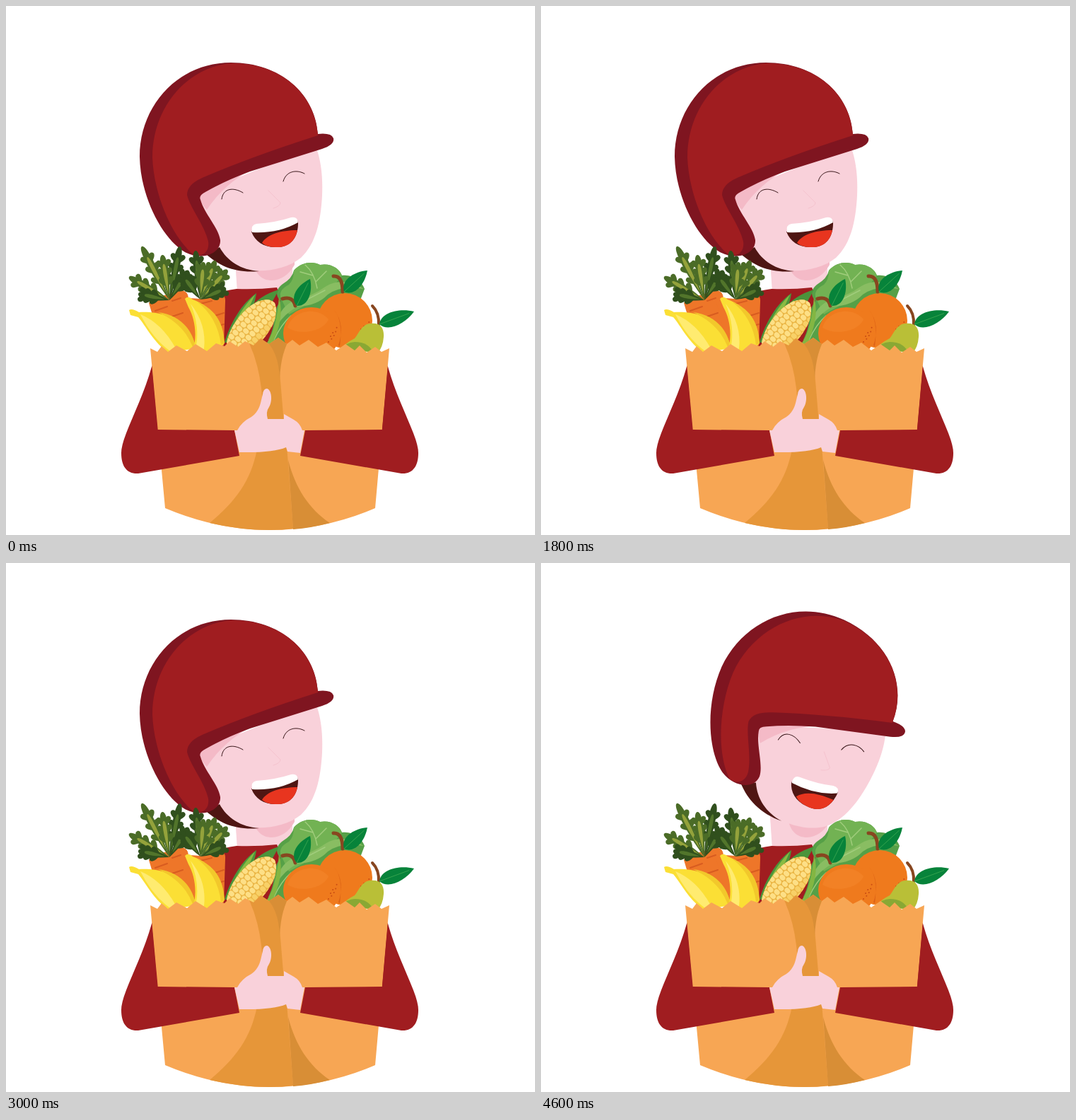
Recreate the animation shown at these times as an HTML page. Size 748 px wide and 748 px high, loop 4.8 s.

```html
<!DOCTYPE html>
<html lang="en">
<head>
<meta charset="utf-8">
<title>Grocery delivery</title>
<style>
html, body { margin: 0; width: 100%; height: 100%; overflow: hidden; background: #fff; }
svg { display: block; width: 100%; height: 100%; }
</style>
</head>
<body>
<svg viewBox="0 0 748 748" fill="none" stroke-linecap="round">
  <!-- neck and shirt -->
  <path fill="#f9d1da" d="M323 345L327 405Q365 425 405 400V345Z"/>
  <path fill="#f4bac7" d="M349 362C353 380 362 388 376 388Q396 387 408 366V345H349Z"/>
  <path fill="#a01d20" d="M290 410Q307 402 326 400Q356 401 383 398L420 490H290Z"/>

  <g id="head">
    <path fill="#f9d1da" d="M260 270L438 198C446 220 448 243 447 268C445 305 438 336 417 356C395 374 358 378 333 371Q310 361 290 335Z"/>
    <path fill="#f4bac7" d="M270 266L352 229Q310 249 284 288L272 274Z"/>
    <path fill="#4f1613" d="M283 351L302 341C313 361 332 373 358 375C325 378 302 368 283 351Z"/>
    <path fill="#7f1520" d="M441 181C437 124 388 80 318 80C244 80 189 140 189 213C190 270 221 329 253 348C278 361 304 350 303 331C301 314 280 293 275 274Q272 268 282 263Q310 247 345 234L447 202Q465 196 463 187Q460 179 441 181Z"/>
    <path fill="#a01d20" d="M441 182C437 124 388 80 318 81C254 87 207 145 207 214C209 267 235 328 266 352C279 355 288 347 286 333C281 310 260 285 256 267C256 255 267 247 282 241Q350 212 441 183Z"/>
    <g stroke="#351316" stroke-width="1">
      <path d="M305 273C307 257 322 256 335 264"/>
      <path d="M392 248C396 233 411 231 422 237"/>
      <path stroke="#f5c3ce" d="M371 261L388 278Q388 283 378 286"/>
    </g>
    <path fill="#4f1613" d="M347 319L413 304C414 330 400 342 381 341C364 341 352 333 347 319Z"/>
    <path fill="#e8351f" d="M362 335C369 323 388 317 412 317C409 333 398 342 381 341Q369 341 362 335Z"/>
    <path fill="#fff" d="M348 320Q346 309 354 308Q382 306 403 299Q412 297 413 306Q385 322 348 320Z"/>
  </g>

  <!-- carrots -->
  <path fill="#ee7629" d="M202 420Q205 413 221 410L248 402Q257 403 258 413L274 480H220Z"/>
  <path fill="#ee7629" d="M248 420Q251 411 273 414L300 408Q311 407 310 418L308 480H264Z"/>
  <path stroke="#d85c20" stroke-width="2" d="M211 431L228 425M235 417L247 413M229 441L250 434M275 421L291 417M289 440L308 434M296 453L308 450"/>
  <g id="tufts"></g>

  <!-- cabbage -->
  <path fill="#56a047" d="M371 472C384 446 375 435 388 417Q377 405 390 394Q405 385 407 374C418 361 435 361 444 366C460 363 472 372 475 381C491 379 503 389 507 400L490 445L380 480Z"/>
  <path fill="#72b253" d="M389 414Q384 402 400 394Q407 387 407 374C418 361 435 361 444 366C460 363 472 372 475 381L455 406L400 436Z"/>
  <path fill="#89bd62" d="M383 452Q384 430 404 418Q434 410 453 396Q475 383 506 400Q474 394 455 408Q440 424 412 425Q394 435 383 452Z"/>
  <path stroke="#a0cd7c" stroke-width="1.5" d="M440 399Q436 377 423 366M438 390L453 375M434 381L416 376M379 472Q389 450 403 438M422 417L451 402"/>

  <!-- corn -->
  <path fill="#4b943b" d="M309 476C317 448 333 421 354 406C351 432 335 455 317 475Z"/>
  <path fill="#8abb43" d="M314 472Q326 434 352 408Q339 440 318 470Z"/>
  <path fill="#4b943b" d="M344 428Q359 409 386 401L375 421Z"/>
  <path fill="#83b642" d="M366 480Q382 462 386 412Q395 443 374 482Z"/>
  <clipPath id="cob"><path d="M312 477C315 455 335 428 354 419Q372 411 380 420C388 441 371 465 353 482L320 486Z"/></clipPath>
  <g clip-path="url(#cob)"><path fill="#eab544" d="M300 400H400V490H300Z"/><g id="kernels"></g></g>

  <!-- oranges -->
  <ellipse cx="479" cy="445" rx="39" ry="39" fill="#ef7a1d"/>
  <path fill="#dc6116" d="M470 480Q480 450 464 430Q477 445 472 481Z"/>
  <ellipse cx="432" cy="463" rx="40" ry="37" fill="#ef7a1d"/>
  <path fill="#f28125" d="M398 455C404 431 439 423 456 443C450 459 418 467 398 455Z"/>
  <path stroke="#c94c12" stroke-width="2" stroke-dasharray="0 6" d="M456 475Q467 466 468 451M459 467L464 459M499 466Q513 455 514 443M502 457L509 450"/>
  <g stroke="#884620" stroke-width="5">
    <path d="M391 414Q406 410 409 424M463 382Q476 381 476 404"/>
    <path stroke-width="4" d="M518 424Q528 434 527 451"/>
  </g>

  <!-- pear -->
  <path fill="#b9bf37" d="M473 486Q479 477 493 470C500 461 503 450 515 449C529 447 535 455 534 468Q533 482 526 490Z"/>
  <path fill="#89a834" d="M473 486Q480 476 493 475Q512 475 519 489Z"/>
  <g id="leaves"></g>

  <!-- bananas -->
  <path fill="#fbdf35" d="M174 430Q178 427 188 433C220 431 259 442 269 484L230 490C209 477 197 451 187 440L176 437Z"/>
  <path fill="#ffeb70" d="M190 436Q220 448 240 484L232 488Q207 470 190 436Z"/>
  <path fill="#f2c82b" d="M215 433C242 436 263 454 268 482H264Q252 450 215 433Z"/>
  <path fill="#fbdf35" d="M253 414Q258 409 264 415C288 424 306 442 309 477L295 490H264C271 465 267 442 258 426Z"/>
  <path fill="#ffeb70" d="M261 421Q284 450 280 485H268Q275 454 261 421Z"/>
  <path fill="#f2c82b" d="M270 418C292 427 308 444 309 477L304 479Q299 440 270 418Z"/>

  <!-- bag, with the upper arms behind it -->
  <path fill="#a01d20" d="M206 510L216 490H530L540 510L545 600H200Z"/>
  <path fill="#f7a654" d="M204 484L214 489L220 481L229 489L241 480L256 488L268 478L284 488L297 477L309 481L316 474L328 482L338 474L350 480L360 470L372 478L385 469L397 478L405 472L415 480L428 472L441 482L453 476L467 487L480 478L493 487L500 480L510 490L522 482L531 489L542 484L522 710Q450 741 373 741Q298 741 225 710Z"/>
  <path fill="#e69639" d="M344 477L350 480L360 470L372 478L385 469L397 478C389 498 385 510 388 530L393 590H363Q365 523 344 477Z"/>
  <path fill="#d88e36" d="M372 478L385 469L397 478Q388 499 387 528Q386 495 372 478Z"/>
  <path fill="#e69639" d="M355 627C346 672 325 700 288 731Q330 741 373 741Q390 741 406 739L397 622Z"/>
  <path fill="#d88e36" d="M399 642C409 681 428 711 458 731Q432 738 406 740Z"/>

  <!-- forearms and hands -->
  <path id="arm" fill="#a01d20" d="M206 510C196 546 180 578 170 604Q163 622 163 632C163 651 171 662 187 661L330 636L323 600L214 599Z"/>
  <use href="#arm" transform="matrix(-1 0 0 1 746 0)"/>
  <path fill="#f9d1da" d="M323 600H327Q333 588 347 581C360 572 360 559 363 549Q364 541 369 541C376 543 377 559 372 567Q367 574 370 584H393V577L407 585Q416 590 419 600H422L416 632L398 630L396 624Q378 632 330 631Z"/>
</svg>
<script>
const byId = id => document.getElementById(id);

// Two mirrored curves; a blunt leaf keeps its full width up to the tip
function leaf(x, y, tx, ty, width, fill, blunt = true) {
  const dx = tx - x, dy = ty - y, len = Math.hypot(dx, dy);
  const nx = -dy / len * width, ny = dx / len * width;
  const [near, far, end] = blunt ? [.55, 1, 1] : [.15, .65, .8];
  const side = s => [x + dx * near + nx * s, y + dy * near + ny * s, x + dx * far + nx * s * end, y + dy * far + ny * s * end];
  const [a, b, c, d] = side(1), [e, f, g, h] = side(-1);
  return `<path fill="${fill}" d="M${x} ${y}C${a} ${b} ${c} ${d} ${tx} ${ty}C${g} ${h} ${e} ${f} ${x} ${y}Z"/>`;
}

// A branch with small lobes along both sides
function frond(x, y, tx, ty, fill, rib) {
  const angle = Math.atan2(ty - y, tx - x), at = t => [x + (tx - x) * t, y + (ty - y) * t];
  let parts = leaf(x, y, tx, ty, 7, fill);
  for (const t of [.3, .5, .68])
    for (const turn of [-.6, .6]) {
      const [px, py] = at(t);
      parts += leaf(px, py, px + 16 * Math.cos(angle + turn), py + 16 * Math.sin(angle + turn), 5, fill);
    }
  return parts + leaf(...at(.15), ...at(.8), 3.5, rib);
}

const tuft = (x, y, tips) => tips.map(([tx, ty], i) =>
  frond(x, y, tx, ty, ['#304f1d', '#4b6c27'][i % 2], ['#52752b', '#94a23b'][i % 2])).join('');

byId('tufts').innerHTML =
  tuft(231, 416, [[246, 340], [174, 383], [258, 374], [192, 340], [187, 407], [221, 352]]) +
  tuft(275, 415, [[268, 346], [313, 373], [249, 380], [296, 360], [311, 399], [279, 362]]);

const green = (x, y, tx, ty) => leaf(x, y, tx, ty, 15, '#07833a', false) +
  `<path stroke="#35a34e" d="M${x} ${y}L${x + (tx - x) * .85} ${y + (ty - y) * .85}"/>`;
byId('leaves').innerHTML = green(411, 424, 430, 386) + green(478, 404, 511, 374) + green(528, 450, 577, 432);

let kernels = '';
for (let row = -4; row < 5; row++)
  for (let col = 0; col < 14; col++)
    kernels += `<ellipse cx="${col * 8 + row % 2 * 4}" cy="${row * 9}" rx="3.6" ry="4.4" fill="${row < 2 ? '#fddf86' : '#f8d067'}"/>`;
byId('kernels').innerHTML = `<g transform="translate(311 488) rotate(-45)">${kernels}</g>`;

const tilts = [0, 10, 25];
function draw(now) {
  const tilt = tilts[Math.floor(now % 4800 / 200) % 3];
  byId('head').setAttribute('transform', `rotate(${tilt} 372 330)`);
  requestAnimationFrame(draw);
}
draw(performance.now());
</script>
</body>
</html>
```
